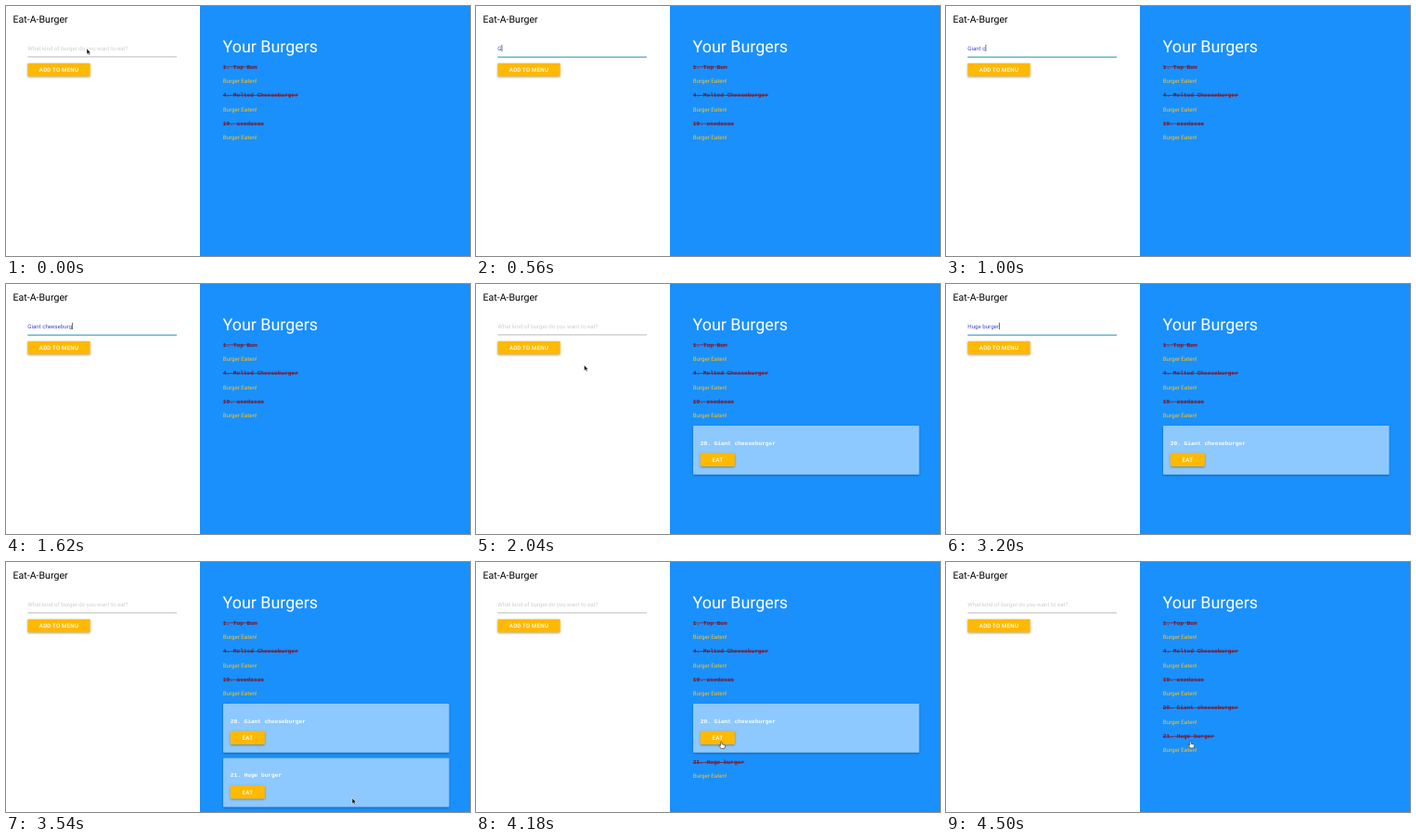
An HTML page for the animation above (4.52 s loop, 500 by 270 pixels).

```html
<!DOCTYPE html>
<html lang="en">
<head>
<meta charset="utf-8">
<title>Eat-A-Burger</title>
<style>
  html, body { margin: 0; width: 100%; height: 100%; overflow: hidden; background: #fff; }
  svg { display: block; width: 100%; height: 100%; }
  text { font: 400 6.15px Roboto, sans-serif; text-rendering: geometricPrecision; white-space: pre; }
  .brand { font-size: 10.6px; }
  .head { font-size: 17.9px; fill: #fff; }
  .mono { font: 700 6.15px "Liberation Mono", monospace; fill: #fff; }
  .struck { fill: #7c1a2c; }
  .done { fill: #ffc21a; }
  .hint { fill: #cfcfcf; }
  .typed { fill: #4549c8; }
  .btn { font-weight: 500; letter-spacing: .2px; fill: #fff; }
</style>
</head>
<body>
<svg id="stage" viewBox="0 0 500 270" xmlns="http://www.w3.org/2000/svg">
  <defs>
    <filter id="shadow" x="-10%" y="-20%" width="120%" height="160%">
      <feDropShadow dx="0" dy=".9" stdDeviation=".9" flood-opacity=".35"/>
    </filter>
  </defs>
  <rect width="500" height="270" fill="#fff"/>
  <rect x="209" width="291" height="270" fill="#1a90fc"/>
  <text class="brand" x="7.5" y="18">Eat-A-Burger</text>
  <text class="head" x="233.5" y="50">Your Burgers</text>
  <text id="hint" class="hint" x="23.3" y="47.7">What kind of burger do you want to eat?</text>
  <text id="typed" class="typed" x="23.3" y="47.7"></text>
  <rect id="caret" y="41.8" width=".7" height="7.2" fill="#333"/>
  <rect id="line" x="23.3" y="54.6" width="160.7"/>
  <g id="add"></g>
  <g id="list"></g>
  <g id="cursor">
    <path id="arrow" d="M0 0V6.2L1.5 4.9L2.5 7.1L3.6 6.6L2.6 4.5H4.4Z" fill="#111" stroke="#fff" stroke-width=".5"/>
    <path id="hand" d="M-.9 .2Q0 -.8 .7 .3V2.4L3.6 3Q4.4 3.3 4.2 4.6L3.4 7H-.1L-2.5 4.2Q-2.6 3.2 -1.6 3.5L-.9 4.1Z" fill="#fff" stroke="#222" stroke-width=".6"/>
  </g>
</svg>
<script>
const LOOP = 4520;
const ROW = 30.6, CARD = 58.7;
const $ = id => document.getElementById(id);

const burgers = [
  { label: "1. Top Bun", added: 0, eaten: 0 },
  { label: "4. Melted Cheeseburger", added: 0, eaten: 0 },
  { label: "19. asedasas", added: 0, eaten: 0 },
  { label: "20. Giant cheeseburger", added: 1840, eaten: 4370 },
  { label: "21. Huge burger", added: 3320, eaten: 3930 }
];

const entries = [
  { text: "Giant cheeseburger", focus: 240, start: 550, rate: 68, end: 1840 },
  { text: "Huge burger", focus: 2330, start: 2590, rate: 60, end: 3320 }
];

// time, x, y of the pointer tip
const path = [
  [0, 87, 46], [200, 89, 45], [1840, 89, 45], [2040, 116.5, 87.5],
  [2300, 90, 45], [3320, 90, 45], [3540, 373, 255], [3780, 264, 249],
  [3960, 264, 249], [4140, 264.5, 194.5], [4300, 263.5, 194], [4520, 263.5, 194]
];

const text = (cls, x, y, s, more = "") => `<text class="${cls}" x="${x}" y="${y}" ${more}>${s}</text>`;

const button = (x, y, w, label) =>
  `<rect x="${x}" y="${y}" width="${w}" height="14.3" rx=".8" fill="#ffb904" filter="url(#shadow)"/>` +
  text("btn", x + w / 2, y + 9.4, label, 'text-anchor="middle"');

const card = (y, label) =>
  `<rect x="234" y="${y - 4.3}" width="243.5" height="52.8" rx=".8" fill="#8dc8fe" filter="url(#shadow)"/>` +
  text("mono", 241.8, y + 16.2, label) + button(241.8, y + 25.3, 37, "EAT");

const eatenRow = (y, label) =>
  text("mono struck", 233.8, y + 2, label) +
  `<rect x="233.8" y="${y}" width="${label.length * 3.69}" height=".7" fill="#7c1a2c"/>` +
  text("done", 233.8, y + 17.4, "Burger Eaten!");

let shown = "";
function drawList(t) {
  let y = 65.5, out = "";
  for (const b of burgers) {
    if (t < b.added) continue;
    const eaten = t >= b.eaten;
    out += (eaten ? eatenRow : card)(y, b.label);
    y += eaten ? ROW : CARD;
  }
  if (out !== shown) $("list").innerHTML = shown = out;
}

function drawInput(t) {
  const e = entries.find(e => t >= e.focus && t < e.end);
  const n = e ? Math.max(0, Math.floor((t - e.start) / e.rate) + 1) : 0;
  const typed = $("typed");
  typed.textContent = e ? e.text.slice(0, n) : "";
  $("hint").style.display = n ? "none" : "";
  $("caret").style.display = e ? "" : "none";
  $("caret").setAttribute("x", 23.4 + (n ? typed.getComputedTextLength() : 0));
  $("line").setAttribute("height", e ? 1.1 : .7);
  $("line").setAttribute("fill", e ? "#3199b3" : "#9c9c9c");
  return n > 0;
}

function drawCursor(t, hidden) {
  const i = path.findIndex(p => p[0] > t);
  const [t0, x0, y0] = path[i - 1], [t1, x1, y1] = path[i];
  const u = (t - t0) / (t1 - t0), k = u * u * (3 - 2 * u);
  const x = x0 + (x1 - x0) * k, y = y0 + (y1 - y0) * k;
  const overEat = t > 3600 && x > 241 && x < 279 && (y > 241 || y < 198);
  $("cursor").style.display = hidden ? "none" : "";
  $("cursor").setAttribute("transform", `translate(${x} ${y})`);
  $("arrow").style.display = overEat ? "none" : "";
  $("hand").style.display = overEat ? "" : "none";
}

function draw(now) {
  const t = now % LOOP;
  drawList(t);
  drawCursor(t, drawInput(t));
}

$("add").innerHTML = button(23.3, 61.8, 67.4, "ADD TO MENU");
const begin = performance.now();
function tick() {
  draw(performance.now() - begin);
  requestAnimationFrame(tick);
}
tick();
</script>
</body>
</html>
```
